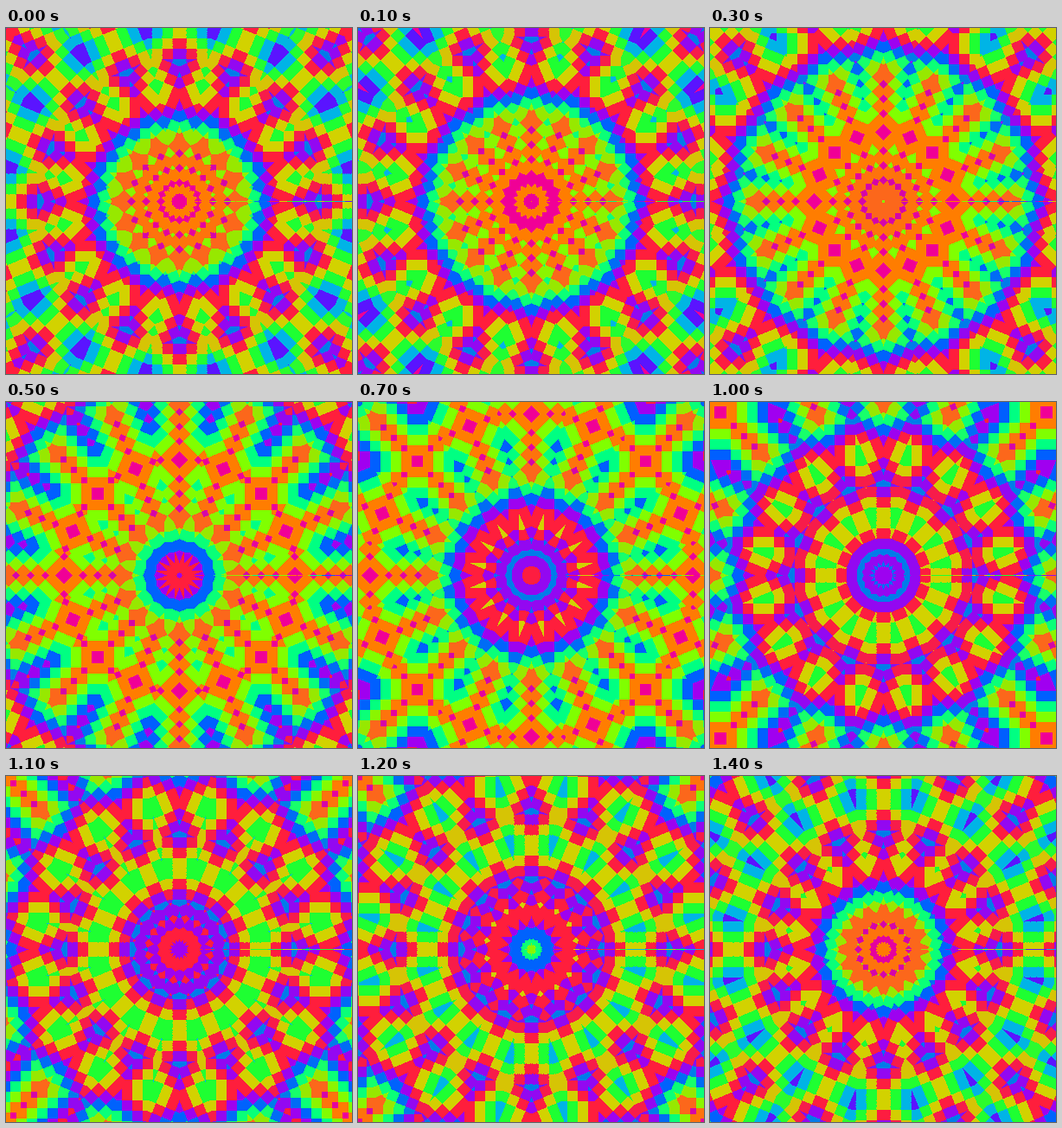
Recreate the animation shown at these times as an HTML page with a canvas. Size 400 px wide and 400 px high, loop 1500 ms.

```html
<!DOCTYPE html>
<html>
<head>
<meta charset="utf-8">
<style>
html, body { margin: 0; width: 400px; height: 400px; overflow: hidden; }
canvas { display: block; }
</style>
</head>
<body>
<canvas id="stage" width="400" height="400"></canvas>
<script>
const SIZE = 400, HALF = SIZE / 2, CELL = 12;
const STEPS = 15, STEP_MS = 100, WEDGE = Math.PI / 8;
const ctx = document.getElementById('stage').getContext('2d');
const image = ctx.createImageData(SIZE, SIZE);
const pixels = new Uint32Array(image.data.buffer);

const palette = [
  [240, 0, 150], [255, 125, 0], [128, 255, 0], [0, 255, 130],
  [0, 95, 255], [160, 0, 240], [255, 30, 60], [210, 210, 0],
  [30, 255, 50], [0, 180, 230], [90, 20, 255]
];

// Colour between two neighbouring palette entries, packed as ABGR.
function mix(level) {
  const n = palette.length, base = Math.floor(level), part = level - base;
  const from = palette[(base + n) % n], to = palette[(base + 1 + n) % n];
  const [r, g, b] = from.map((c, k) => Math.round(c + (to[k] - c) * part));
  return (255 << 24 | b << 16 | g << 8 | r) >>> 0;
}

// Colour of each cell, by its column (outwards) and row (sideways).
const ROWS = 6, COLUMNS = 25;
const cells = Array.from({ length: ROWS * COLUMNS }, (_, k) => {
  const column = Math.floor(k / ROWS), row = k % ROWS;
  return mix(23 - column - row - 0.02 * row * row);
});

// Angle from the axis of the nearest of sixteen wedges.
function fold(dx, dy) {
  const angle = Math.atan2(dy, dx);
  return Math.abs(angle - WEDGE * Math.round(angle / WEDGE));
}

const along = new Float64Array(SIZE * SIZE);
const across = new Float64Array(SIZE * SIZE);
for (let i = 0; i < SIZE * SIZE; i++) {
  const dx = i % SIZE - HALF, dy = Math.floor(i / SIZE) - HALF;
  // The seam of the angle shows the wedge's edge instead of its axis.
  const angle = dy === 0 && dx > 0 ? WEDGE / 2 : fold(dx, dy);
  const r = Math.hypot(dx, dy);
  along[i] = r * Math.cos(angle);
  across[i] = r * Math.sin(angle);
}

// The tile is itself a kaleidoscope of square cells around its centre.
function tileColor(x, y) {
  const dx = x - HALF, dy = HALF - y;
  const r = Math.hypot(dx, dy), angle = fold(dx, dy);
  const column = Math.floor(r * Math.cos(angle) / CELL);
  const row = Math.floor(r * Math.sin(angle) / CELL);
  return cells[column * ROWS + row];
}

// The wedges look along the edge of the tile, which slides outwards.
function draw(step) {
  const shift = step * SIZE / STEPS;
  for (let i = 0; i < pixels.length; i++) {
    pixels[i] = tileColor((along[i] - shift + SIZE) % SIZE, across[i]);
  }
  ctx.putImageData(image, 0, 0);
}

let shown = -1;
function tick() {
  const step = Math.floor(performance.now() / STEP_MS) % STEPS;
  if (step !== shown) draw(shown = step);
  requestAnimationFrame(tick);
}
tick();
</script>
</body>
</html>
```
